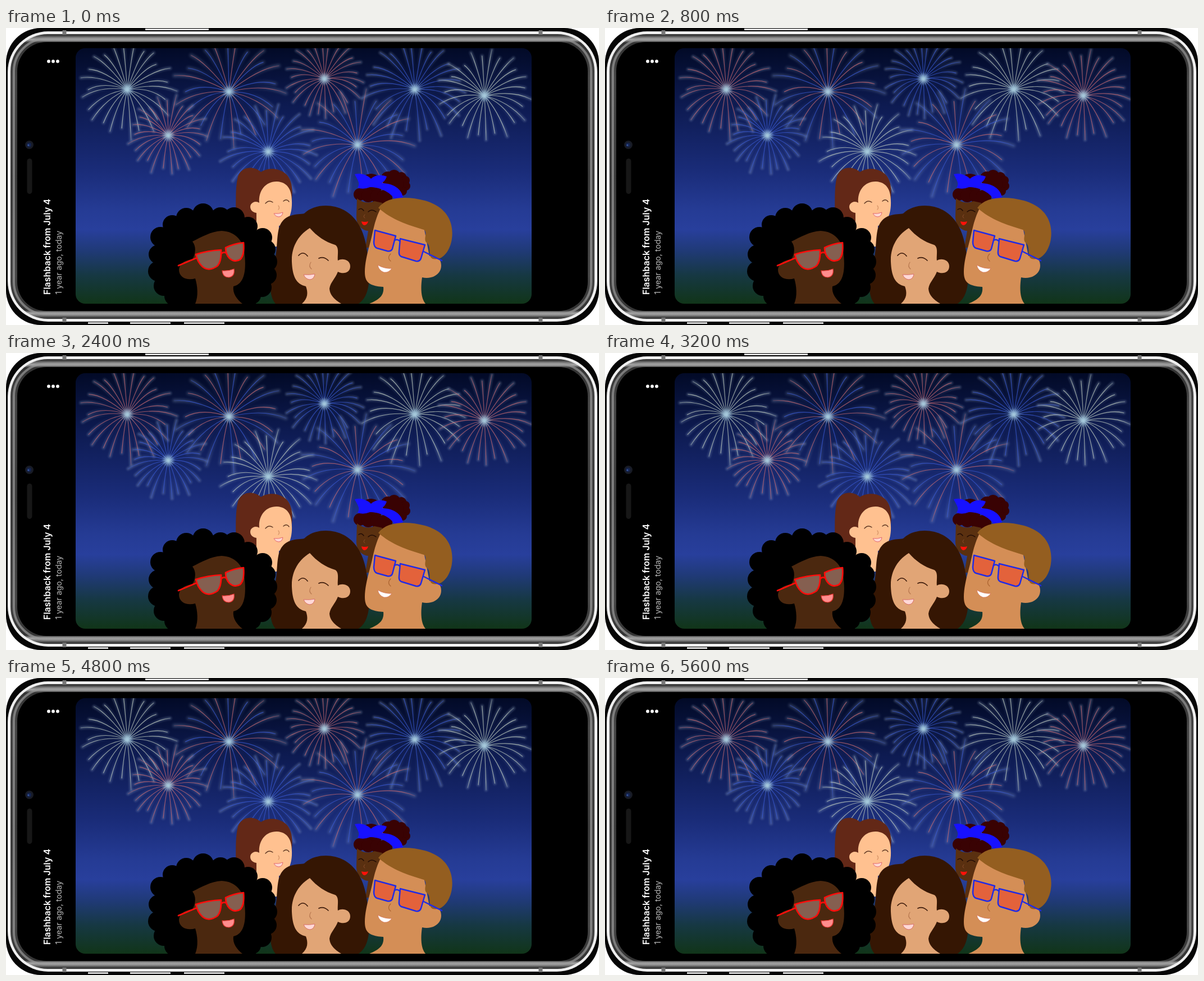
An HTML page that plays this animation: 1056 px wide and 530 px high, repeating every 6400 ms.

```html
<!DOCTYPE html>
<html lang="en">
<head>
<meta charset="utf-8">
<title>Flashback</title>
<style>
  html, body { margin: 0; width: 100%; height: 100%; overflow: hidden; background: #fff; }
  svg { display: block; width: 1056px; height: 530px; }
  text { font-family: Inter, sans-serif; }
  .show { animation: swap 1.6s step-end infinite; }
  .late { animation-name: swap-late; }
  .line { fill: none; stroke-linecap: round; }
  @keyframes swap { 0% { visibility: visible; } 50%, 100% { visibility: hidden; } }
  @keyframes swap-late { 0% { visibility: hidden; } 50%, 100% { visibility: visible; } }
</style>
</head>
<body>
<svg viewBox="0 0 1056 530">
  <defs>
    <linearGradient id="sky" x2="0" y2="1">
      <stop offset="0" stop-color="#020a27"/>
      <stop offset=".22" stop-color="#0d1a50"/>
      <stop offset=".48" stop-color="#1a2c79"/>
      <stop offset=".63" stop-color="#253b94"/>
      <stop offset=".71" stop-color="#283f9c"/>
      <stop offset=".79" stop-color="#203a78"/>
      <stop offset=".89" stop-color="#163842"/>
      <stop offset="1" stop-color="#113519"/>
    </linearGradient>
    <linearGradient id="metal" gradientUnits="userSpaceOnUse" x1="0" y1="11" x2="0" y2="519">
      <stop offset="0" stop-color="#222"/>
      <stop offset=".012" stop-color="#777"/>
      <stop offset=".02" stop-color="#aaa"/>
      <stop offset=".03" stop-color="#333"/>
      <stop offset=".15" stop-color="#454545"/>
      <stop offset=".5" stop-color="#3a3a3a"/>
      <stop offset=".85" stop-color="#454545"/>
      <stop offset=".97" stop-color="#333"/>
      <stop offset=".98" stop-color="#aaa"/>
      <stop offset=".988" stop-color="#777"/>
      <stop offset="1" stop-color="#222"/>
    </linearGradient>
    <radialGradient id="core">
      <stop offset="0" stop-color="#a9ccdc" stop-opacity=".9"/>
      <stop offset=".4" stop-color="#94b8d2" stop-opacity=".55"/>
      <stop offset="1" stop-color="#7fa4cf" stop-opacity="0"/>
    </radialGradient>
    <radialGradient id="haze" gradientUnits="userSpaceOnUse" cx="0" cy="0" r="104">
      <stop offset=".4" stop-color="#7f9ed0" stop-opacity=".04"/>
      <stop offset=".8" stop-color="#93a9c8" stop-opacity=".25"/>
      <stop offset="1" stop-color="#93a9c8" stop-opacity=".3"/>
    </radialGradient>
    <filter id="soft" x="-20%" y="-20%" width="140%" height="140%"><feGaussianBlur stdDeviation="2"/></filter>
    <clipPath id="screen"><rect x="124" y="36" width="812" height="456" rx="17"/></clipPath>
  </defs>

  <g id="phone">
    <rect width="1056" height="530" rx="62" fill="#050505"/>
    <path d="M248 2.500H361M146 526.500H182M221 526.500H293M317 526.500H389" stroke="#ddd" stroke-width="3"/>
    <rect x="3" y="6" width="1050" height="518" rx="72" fill="#efefef"/>
    <rect x="8" y="11" width="1040" height="508" rx="66" fill="url(#metal)"/>
    <rect x="14" y="19" width="1028" height="492" rx="58" fill="none" stroke="#999" stroke-opacity=".7" stroke-width="4"/>
    <path d="M104 4v8M952 4v8M104 517v8M952 517v8" stroke="#777" stroke-width="7"/>
    <rect x="20" y="25" width="1016" height="480" rx="52" fill="#000"/>
    <g fill="#fff"><circle cx="76" cy="59.5" r="2.9"/><circle cx="84" cy="59.5" r="2.9"/><circle cx="92" cy="59.5" r="2.9"/></g>
    <circle cx="41.500" cy="208.500" r="7.500" fill="#181b25"/>
    <circle cx="41" cy="208.500" r="4" fill="#14234c"/>
    <circle cx="40" cy="209" r="1.600" fill="#3c5aa0"/>
    <rect x="37.500" y="233" width="9" height="63" rx="4.500" fill="#171717"/>
    <text transform="translate(79 476) rotate(-90)" font-size="16" font-weight="600" fill="#fff">Flashback from July 4</text>
    <text transform="translate(99 475.500) rotate(-90)" font-size="14.200" fill="#b9b9b9">1 year ago, today</text>
  </g>

  <g clip-path="url(#screen)">
    <rect x="124" y="36" width="812" height="456" fill="url(#sky)"/>
    <g class="show" id="first"></g>
    <g class="show late" id="second"></g>

    <g id="ponytail">
      <path d="M408 345C411 315 407 290 413 265C420 246 442 246 454 257C468 248 487 250 499 261C508 270 511 284 509 305L480 300L455 345Z" fill="#632817"/>
      <path d="M451 312C449 290 463 273 483 274C500 275 509 287 509 309C510 332 502 350 486 353L485 390H446V330C437 329 433 321 436 315C440 309 447 309 451 312Z" fill="#ffc190"/>
      <g class="line" stroke="#5f3824" stroke-width="1.400">
        <path d="M462 313q6-7 13-2M494 309q6-5 10 1"/>
        <path d="M485 317q3 4 0 7" stroke="#d9986b"/>
      </g>
      <path d="M477 331q9 1 16-2q-1 8-8 8q-5 0-8-6z" fill="#ffd7d3" stroke="#e2696b"/>
    </g>

    <g id="headband">
      <g fill="#390203" data-puffs="680 268 12 691 264 11 704 266 9 711 272 8 712 282 8 706 291 8 690 278 18 650 280 20 630 297 11 645 299 12 661 300 12 674 303 14"></g>
      <path d="M625 304Q640 316 656 309L670 312L664 358L655 392H640L645 362C632 361 623 349 624 335Z" fill="#5a3010"/>
      <path d="M621 261C632 258 643 262 650 269C657 262 668 261 678 265C676 271 673 274 669 277C690 277 704 287 707 302L693 307C684 291 663 284 648 284Q636 289 626 285C632 277 625 270 621 261Z" fill="#1711ff"/>
      <g class="line" stroke="#210b04" stroke-width="1.500">
        <path d="M628 324q5-4 9 2M645 328q6-6 14 0"/>
        <path d="M639 333q-4 4 0 6" stroke="#8a4d2b" stroke-width="1"/>
      </g>
      <path d="M633 345q6 2 12 0q-2 7-7 7q-4-1-5-7z" fill="#ff1109"/>
    </g>

    <g id="middle">
      <path d="M480 492C467 478 469 445 479 414C485 388 480 358 493 344C504 331 522 333 531 331C548 314 580 313 602 325C629 340 639 369 643 398C648 430 653 478 626 493Z" fill="#351603"/>
      <path d="M541 357C553 371 569 382 586 387C594 391 590 405 591 415C599 410 613 414 613 425C613 437 601 440 591 435C586 448 578 453 576 465C577 479 588 486 597 492H527C538 482 538 472 534 461C516 457 510 442 509 417C508 394 518 371 541 357Z" fill="#e1a576"/>
      <g class="line" stroke="#3c1a0a" stroke-width="1.700">
        <path d="M521 406q8-9 16 1M557 411q9-4 17 4"/>
        <path d="M543 418q-5 7 1 12" stroke="#b87850" stroke-width="1.200"/>
      </g>
      <path d="M530 440q11 1 20-1q-1 9-9 10q-8-1-11-9z" fill="#ffd9d6" stroke="#d9706b"/>
    </g>

    <g id="afro">
      <ellipse cx="366" cy="412" rx="95" ry="84"/>
      <rect x="290" y="440" width="155" height="54"/>
      <g data-puffs="275 373 18 296 351 17 321 339 18 351 332 19 382 338 18 406 339 19 431 354 17 457 374 17 463 395 17 465 417 18 465 441 17 456 463 17 438 477 16 271 404 17 271 434 18 281 460 18 300 478 18"></g>
      <path d="M332 381C348 373 365 363 384 362C410 363 424 382 425 405C428 434 424 457 405 461C403 474 412 485 421 492H337C343 478 341 460 337 447C323 451 308 446 308 431C309 420 319 414 332 413C338 402 339 390 332 381Z" fill="#4b280f"/>
      <g fill="#855f50" stroke="#ff0d0b" stroke-width="2.700" stroke-linejoin="round">
        <path d="M338 404Q360 397 383 396Q384 417 376 425Q361 435 350 426Q341 418 338 404Z"/>
        <path d="M391 392Q405 385 423 383Q425 405 417 413Q407 419 398 411Q391 404 391 392Z"/>
        <path class="line" d="M307 424L340 410M383 403Q387 399 391 401"/>
      </g>
      <path d="M385 433q11 1 21-3q2 13-9 15q-11 0-12-12z" fill="#ff8d8d" stroke="#e4342f" stroke-width="1.200"/>
    </g>

    <g id="man">
      <path d="M668 320C655 345 654 365 648 385C641 410 637 432 640 445C643 458 656 461 672 462C674 480 661 486 645 493H748C739 484 738 465 741 445C756 449 775 441 775 424C775 411 766 405 754 407L744 355Z" fill="#d48e56"/>
      <path d="M663 321C678 300 715 300 746 308C784 319 798 345 794 376C791 398 777 416 760 412C750 408 759 390 749 383C742 377 752 365 744 360C714 351 687 342 663 321Z" fill="#945e20"/>
      <g fill="#e3623b" stroke="#202be6" stroke-width="2.500" stroke-linejoin="round">
        <path d="M657 361L694 371L688 394Q686 399 679 398L661 393Q655 391 655 382Z"/>
        <path d="M702 376L746 387L739 411Q737 417 730 416L704 408Q699 406 700 398Z"/>
        <path class="line" d="M692 379Q697 376 701 380M744 399L776 415"/>
      </g>
      <path class="line" d="M685 403q-7 7 0 13" stroke="#ad6632" stroke-width="1.300"/>
      <path d="M662 423q12 7 25 6q-5 8-14 7q-9-3-11-13z" fill="#fff" stroke="#d57356" stroke-width=".8"/>
    </g>
  </g>
</svg>
<script>
  const NS = "http://www.w3.org/2000/svg";
  const el = (parent, tag, attrs) => {
    const node = document.createElementNS(NS, tag);
    for (const key in attrs) node.setAttribute(key, attrs[key]);
    return parent.appendChild(node);
  };
  const rnd = n => { const v = Math.sin(n * 12.9898) * 43758.5453; return v - Math.floor(v); };

  for (const group of document.querySelectorAll("[data-puffs]")) {
    const v = group.dataset.puffs.split(" ");
    for (let i = 0; i < v.length; i += 3) el(group, "circle", { cx: v[i], cy: v[i + 1], r: v[i + 2] });
  }

  const colors = { red: "#c9676f", blue: "#3859d6", cream: "#c3cfc0" };
  const defs = document.querySelector("defs");
  for (const name in colors) {
    const grad = el(defs, "radialGradient", { id: name, gradientUnits: "userSpaceOnUse", cx: 0, cy: 0, r: 104 });
    [[0, "#a5cbdd", .9], [.2, colors[name], .7], [.75, colors[name], .8], [1, colors[name], .25]].forEach(
      ([offset, color, alpha]) => el(grad, "stop", { offset, "stop-color": color, "stop-opacity": alpha }));
  }

  // Rays leave steeply and bend over, with uneven lengths.
  function rays(seed, parity) {
    const count = 26;
    let d = "";
    for (let i = parity; i < count; i += 2) {
      const a = (i + .4 * rnd(seed * 50 + i)) / count * 2 * Math.PI;
      const r = (i % 2 ? 78 : 92) + 12 * rnd(seed * 90 + i);
      const x = r * Math.cos(a), y = r * Math.sin(a);
      d += `M0 0Q${(x * .6).toFixed(1)} ${(y * .55 - 17).toFixed(1)} ${x.toFixed(1)} ${y.toFixed(1)}`;
    }
    return d;
  }

  // x, y, radius, then long and short ray colours in each phase
  const bursts = [
    [216, 110, 87, "cream cream", "red red"],
    [397, 114, 98, "red blue", "blue red"],
    [567, 91, 72, "red red", "blue blue"],
    [728, 110, 93, "blue blue", "cream cream"],
    [852, 121, 83, "cream cream", "red red"],
    [289, 192, 71, "red red", "blue blue"],
    [467, 221, 86, "blue blue", "cream cream"],
    [626, 209, 100, "red blue", "blue red"]
  ];

  ["first", "second"].forEach((id, phase) => {
    const sky = document.getElementById(id);
    bursts.forEach(([x, y, r, ...tones], seed) => {
      const k = r / 100;
      const g = el(sky, "g", { transform: `translate(${x} ${y}) scale(${k})`, class: "line" });
      const shapes = [rays(seed + 1, 0), rays(seed + 1, 1)];
      el(g, "path", { d: shapes.join(""), stroke: "url(#haze)", "stroke-width": 6 / k, filter: "url(#soft)" });
      tones[phase].split(" ").forEach((tone, i) =>
        el(g, "path", { d: shapes[i], stroke: `url(#${tone})`, "stroke-width": 1.15 / k }));
      el(g, "circle", { r: 12 / k, fill: "url(#core)" });
    });
  });
</script>
</body>
</html>
```
